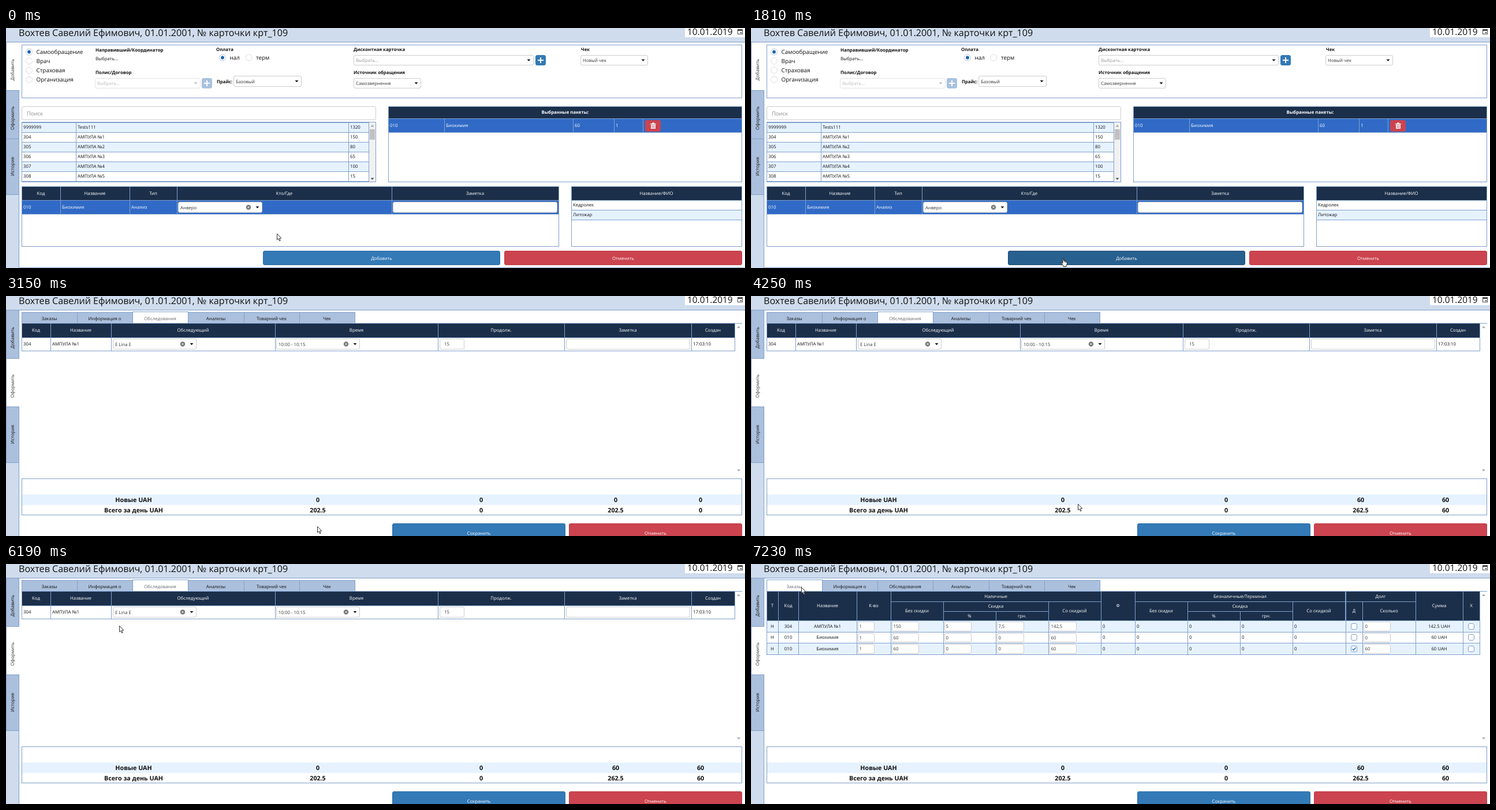
An HTML page with a canvas for the animation above (8 s loop, 1280 by 417 pixels).

```html
<!DOCTYPE html>
<html lang="ru">
<head>
<meta charset="utf-8">
<title>Карточка</title>
<style>
html, body { margin: 0; width: 100%; height: 100%; overflow: hidden; background: #cfdced; }
canvas { display: block; }
</style>
</head>
<body>
<canvas id="stage" width="1280" height="417"></canvas>
<script>
const ctx = document.getElementById('stage').getContext('2d');
const LOOP = 8000;
const C = {
  strip: '#cfdced', tab: '#abc0dd', line: '#7f9fcb', navy: '#1b2f4a', row: '#306ac6', stripe: '#e6f2ff',
  blue: '#337ab7', hover: '#286090', red: '#cb444f', ink: '#111', grey: '#999', field: '#ccc', white: '#fff'
};
const EDGE = { [C.blue]: '#2e6da4', [C.hover]: '#204d74', [C.red]: '#bf3a46' };
const UI = 7.8;

// Pointer stops: time, x, y. An arrow is placed by its tip, a hand by its upper left corner.
const STOPS = [
  [0, 469, 357], [130, 481, 362], [270, 485, 364], [420, 487, 365], [570, 488, 365],
  [840, 495, 368], [970, 507, 371], [1110, 517, 376], [1240, 526, 382], [1380, 530, 387],
  [1510, 529, 389], [1660, 534, 397], [1810, 537, 400], [3150, 539, 400],
  [4130, 549, 387], [4250, 566, 361], [4400, 606, 310], [4530, 659, 248], [4660, 683, 220],
  [5210, 683, 219], [5340, 680, 218], [5490, 668, 217], [5640, 590, 207], [5770, 469, 182],
  [5910, 362, 159], [6040, 260, 137], [6190, 196, 107], [6310, 148, 85], [6460, 107, 65],
  [6610, 89, 48], [6770, 86, 43], [6920, 84, 41], [7230, 87, 40]
];
const within = (t, from, to) => t >= from && t < to;

function text(label, x, y, { size = UI, color = C.ink, align = 'left', bold = false } = {}) {
  ctx.font = `${bold ? 700 : 400} ${size}px "Open Sans", "Noto Sans", sans-serif`;
  ctx.textRendering = 'geometricPrecision';
  ctx.textAlign = align;
  ctx.fillStyle = color;
  ctx.fillText(label, x, y + size * 0.36);
}

const fill = (x0, y0, x1, y1, color) => {
  ctx.fillStyle = color;
  ctx.fillRect(x0, y0, x1 - x0, y1 - y0);
};

function box(x0, y0, x1, y1, color, border = C.line) {
  fill(x0, y0, x1, y1, color);
  ctx.lineWidth = 1;
  ctx.strokeStyle = border;
  ctx.strokeRect(x0 + .5, y0 + .5, x1 - x0 - 1, y1 - y0 - 1);
}

function rounded(x0, y0, x1, y1, color, border = color) {
  ctx.beginPath();
  ctx.roundRect(x0 + .5, y0 + .5, x1 - x0 - 1, y1 - y0 - 1, 2.5);
  ctx.fillStyle = color;
  ctx.fill();
  ctx.lineWidth = 1;
  ctx.strokeStyle = border;
  ctx.stroke();
}

function polygon(points, color, outline) {
  ctx.beginPath();
  points.forEach(([x, y]) => ctx.lineTo(x, y));
  ctx.closePath();
  ctx.fillStyle = color;
  ctx.fill();
  if (outline) { ctx.strokeStyle = outline; ctx.lineWidth = 1; ctx.stroke(); }
}

function circle(x, y, r, color, border) {
  ctx.beginPath();
  ctx.arc(x, y, r, 0, 7);
  ctx.lineWidth = 1;
  if (color) { ctx.fillStyle = color; ctx.fill(); }
  if (border) { ctx.strokeStyle = border; ctx.stroke(); }
}

function stroke(points, color, width = 1) {
  ctx.beginPath();
  points.forEach(([x, y], i) => i ? ctx.lineTo(x, y) : ctx.moveTo(x, y));
  ctx.lineWidth = width;
  ctx.strokeStyle = color;
  ctx.stroke();
}

const triangle = (x, y, color, dir = 1) =>
  polygon([[x - 3, y - 1.5 * dir], [x + 3, y - 1.5 * dir], [x, y + 1.7 * dir]], color);

function cell(x0, y0, x1, y1, label, { color = C.white, align = 'left', ink = C.ink } = {}) {
  box(x0, y0, x1 + 1, y1 + 1, color);
  text(label, align === 'center' ? (x0 + x1) / 2 : x0 + 3, (y0 + y1) / 2, { color: ink, align });
}

const head = (x0, y0, x1, y1, label) =>
  cell(x0, y0, x1, y1, label, { color: C.navy, align: 'center', ink: C.white });

const headRow = (edges, y0, y1, labels) =>
  labels.forEach((label, i) => head(edges[i], y0, edges[i + 1], y1, label));

function input(x0, y0, x1, y1, label = '', pad = 3) {
  rounded(x0, y0, x1, y1, C.white, C.field);
  text(label, x0 + pad, (y0 + y1) / 2, { color: '#333' });
}

function select(x0, y0, x1, y1, label, { ink = '#333', arrow = C.ink, border = C.field, clear = false } = {}) {
  rounded(x0, y0, x1, y1, C.white, border);
  const y = (y0 + y1) / 2;
  text(label, x0 + 4, y + .5, { color: ink });
  triangle(x1 - 8.5, y, arrow);
  if (clear) {
    const x = x1 - 24;
    circle(x, y, 4.2, '#777');
    stroke([[x - 1.6, y - 1.6], [x + 1.6, y + 1.6]], C.white);
    stroke([[x + 1.6, y - 1.6], [x - 1.6, y + 1.6]], C.white);
  }
}

function button(x0, y0, x1, y1, labelY, label, color) {
  rounded(x0, y0, x1, y1, color, EDGE[color]);
  text(label, (x0 + x1) / 2, labelY, { color: C.white, align: 'center' });
}

function plus(x, y, color) {
  rounded(x, y, x + 18, y + 18, color);
  fill(x + 4, y + 8, x + 14, y + 10, C.white);
  fill(x + 8, y + 4, x + 10, y + 14, C.white);
}

function radio(x, y, label, checked) {
  circle(x, y, 5.5, C.white, checked ? '#b5c6dc' : '#ddd');
  if (checked) circle(x, y, 2.9, '#1f66b0');
  text(label, x + 12.5, y, { size: 9.9 });
}

function checkbox(x, y, checked) {
  rounded(x - 5, y - 5, x + 6, y + 6, C.white, C.line);
  if (checked) stroke([[x - 2.5, y + .5], [x - .3, y + 2.7], [x + 3.5, y - 2]], '#1f66b0', 1.3);
}

function frame(active) {
  fill(0, 0, 1280, 417, C.strip);
  text('Вохтев Савелий Ефимович, 01.01.2001, № карточки крт_109', 22, 8.3, { size: 16.1 });
  fill(1176, 0, 1280, 16, C.white);
  text('10.01.2019', 1180, 6.4, { size: 15.4 });
  box(1267, 2, 1276, 11, C.white, '#444');
  fill(1267, 2, 1276, 5, '#444');
  fill(1272, 7, 1274, 9, '#444');
  box(22, 24, 1281, 418, C.white);
  // Each side label: top, bottom and the centre of its upright text.
  [['Добавить', 24, 108, 72.5], ['Оформить', 108, 192, 156.5], ['История', 192, 289, 240.5]]
    .forEach(([label, y0, y1, middle], i) => {
      box(0, y0, 23, y1 + 1, i === active ? C.white : C.tab);
      if (i === active) fill(22, y0 + 1, 23, y1, C.white);
      ctx.save();
      ctx.translate(11.5, middle);
      ctx.rotate(-Math.PI / 2);
      text(label, 0, 0, { size: 8, align: 'center', color: i === active ? '#333' : C.ink });
      ctx.restore();
    });
}

function orderForm() {
  box(27, 29, 1275, 122, C.white);
  ['Самообращение', 'Врач', 'Страховая', 'Организация'].forEach((label, i) => radio(40, 41.5 + i * 16, label, !i));
  radio(375, 51.5, 'нал', true);
  radio(420.5, 51.5, 'терм');
  [['Направивший/Координатор', 155, 38], ['Оплата', 364, 37.5], ['Дисконтная карточка', 602, 37.5], ['Чек', 996, 37.5],
   ['Полис/Договор', 155, 77], ['Прайс:', 365, 93], ['Источник обращения', 602, 77]]
    .forEach(([label, x, y]) => text(label, x, y, { bold: true }));
  text('Выбрать...', 155, 53.5);
  select(154, 87, 337, 105, 'Выбрать...', { ink: '#bbb', arrow: '#bbb', border: '#e3e3e3' });
  plus(339, 87, '#a9c2de');
  select(394, 83, 512, 102, 'Базовый');
  select(602, 47, 914, 65, 'Выбрать...', { ink: C.grey });
  plus(917, 47, C.blue);
  select(602, 87, 719, 105, 'Самозвернення');
  select(995, 47, 1112, 65, 'Новый чек');
}

function searchList() {
  rounded(27, 136, 641, 160, C.white, C.field);
  text('Поиск', 36, 148.5, { size: 9.4, color: '#8a8a8a' });
  const prices = [1320, 150, 80, 65, 100, 15];
  prices.forEach((price, i) => {
    const y = 164 + i * 17, opt = { color: i % 2 ? C.white : C.stripe };
    cell(27, y, 121, y + 17, i ? 303 + i : '9999999', opt);
    cell(121, y, 593, y + 17, i ? 'АМПУЛА №' + i : 'Tests111', opt);
    cell(593, y, 628, y + 17, price, opt);
  });
  fill(28, 267, 628, 268, C.stripe);
  fill(629, 164, 640, 267, '#f1f1f1');
  fill(630, 176, 639, 194, '#c1c1c1');
  triangle(634.5, 170, '#a3a3a3', -1);
  triangle(634.5, 262, '#505050');
  ctx.strokeStyle = C.line;
  ctx.strokeRect(27.5, 163.5, 613, 104);
}

function packages() {
  box(662, 136, 1275, 268, C.white);
  fill(663, 137, 1274, 157, C.navy);
  text('Выбранные пакеты:', 968.5, 146, { bold: true, color: C.white, align: 'center' });
  const edges = [662, 759, 982, 1053, 1103, 1274];
  ['010', 'Биохимия', '60', '1', ''].forEach((label, i) =>
    cell(edges[i], 157, edges[i + 1], 181, label, { color: C.row, ink: C.white }));
  rounded(1107, 160, 1134, 180, C.red);
  fill(1116, 166, 1126, 167.3, C.white);
  fill(1119, 164.5, 1123, 166, C.white);
  fill(1117, 168, 1125, 175, C.white);
  [1118.6, 1120.6, 1122.6].forEach(x => fill(x, 169, x + .8, 174, C.red));
}

function chosenItems(hovered) {
  box(27, 275, 958, 380, C.white);
  const edges = [27, 94, 214, 296, 668, 957];
  headRow(edges, 275, 299, ['Код', 'Название', 'Тип', 'Кто/Где', 'Заметка']);
  ['010', 'Биохимия', 'Анализ', '', ''].forEach((label, i) =>
    cell(edges[i], 299, edges[i + 1], 323, label, { color: C.row, ink: C.white }));
  select(298, 302, 444, 321, 'Анверо', { clear: true });
  input(670, 302, 955, 321);
  box(979, 275, 1275, 380, C.white);
  head(979, 275, 1274, 299, 'Название/ФИО');
  cell(979, 299, 1274, 316, 'Кедролек');
  cell(979, 316, 1274, 333, 'Литожар', { color: C.stripe });
  button(445, 387, 856, 412, 400, 'Добавить', hovered ? C.hover : C.blue);
  button(863, 387, 1275, 412, 400, 'Отменить', C.red);
}

function checkout(active, hovered, updated) {
  fill(27, 47, 1275, 48, C.line);
  const labels = ['Заказы', 'Информация о', 'Обследования', 'Анализы', 'Товарний чек', 'Чек'];
  const edge = i => Math.floor(27 + i * 96.3);
  labels.forEach((label, i) => {
    const x = edge(i), next = edge(i + 1);
    const current = i === active;
    box(x, current ? 27 : 28, next + 1, 48, current ? C.white : C.tab);
    const faded = current || hovered && !i;
    text(label, (x + next) / 2, 39, { align: 'center', color: faded ? '#666' : C.ink });
  });
  triangle(1269, 54, '#a3a3a3', -1);
  triangle(1269, 303, '#a3a3a3');
  box(27, 317, 1275, 381, C.white);
  fill(28, 345, 1274, 363, C.stripe);
  const totals = updated
    ? [['Новые UAH', '0', '0', '60', '60'], ['Всего за день UAH', '202.5', '0', '262.5', '60']]
    : [['Новые UAH', '0', '0', '0', '0'], ['Всего за день UAH', '202.5', '0', '202.5', '0']];
  totals.forEach((row, i) => row.forEach((label, j) =>
    text(label, [221, 540, 823, 1056, 1203][j], 354 + i * 18, { size: 10.7, bold: true, align: 'center' })));
  button(669, 395, 969, 425, 412, 'Сохранить', C.blue);
  button(975, 395, 1275, 425, 412, 'Отменить', C.red);
}

function examinations() {
  const edges = [27, 77, 182, 466, 748, 967, 1187, 1262];
  headRow(edges, 47, 72, ['Код', 'Название', 'Обследующий', 'Время', 'Продолж.', 'Заметка', 'Создан']);
  ['304', 'АМПУЛА №1', '', '', '', '', '17:03:10'].forEach((label, i) => cell(edges[i], 72, edges[i + 1], 95, label));
  select(185, 74, 330, 93, 'E Lina E', { clear: true });
  select(468, 74, 613, 93, '10:00 - 10:15', { clear: true });
  input(751, 74, 794, 93, '15', 8);
  input(970, 74, 1185, 93);
}

function orders() {
  headRow([27, 47, 82, 183, 242], 47, 98, ['Т', 'Код', 'Название', 'К-во']);
  [[242, 'Наличные'], [665, 'Безналичные/Терминал']].forEach(([x, label]) => {
    head(x, 47, x + 364, 65, label);
    head(x, 65, x + 91, 98, 'Без скидки');
    head(x + 91, 65, x + 273, 82, 'Скидка');
    headRow([x + 91, x + 182, x + 273], 82, 98, ['%', 'грн.']);
    head(x + 273, 65, x + 364, 98, 'Со скидкой');
  });
  head(606, 47, 665, 98, 'Ф');
  head(1030, 47, 1151, 65, 'Долг');
  headRow([1030, 1059, 1151], 65, 98, ['Д', 'Сколько']);
  headRow([1151, 1233, 1262], 47, 98, ['Сумма', 'X']);

  const rows = [
    ['304', 'АМПУЛА №1', ['150', '5', '7,5', '142,5'], '0', '142.5 UAH'],
    ['010', 'Биохимия', ['60', '0', '0', '60'], '0', '60 UAH'],
    ['010', 'Биохимия', ['60', '0', '0', '60'], '60', '60 UAH']
  ];
  rows.forEach(([code, name, cash, debt, sum], i) => {
    const y = Math.round(98 + i * 19.5), y1 = Math.round(98 + (i + 1) * 19.5), mid = (y + y1) / 2;
    const color = i % 2 ? C.white : C.stripe, centered = { color, align: 'center' };
    const field = (x, width, label) => input(x, y + 2, x + width, y1 - 1, label, 2.5);
    cell(27, y, 47, y1, 'Н', centered);
    cell(47, y, 82, y1, code, centered);
    cell(82, y, 183, y1, name, centered);
    cell(183, y, 242, y1, '', { color });
    field(185, 29, '1');
    cash.forEach((value, j) => {
      const x = 242 + j * 91;
      cell(x, y, x + 91, y1, '', { color });
      field(x + 2, 47, value);
    });
    const plain = [606, 665, 756, 847, 938, 1030];
    plain.slice(0, -1).forEach((x, j) => cell(x, y, plain[j + 1], y1, '0', { color }));
    cell(1030, y, 1059, y1, '', { color });
    checkbox(1044, Math.floor(mid), i === 2);
    cell(1059, y, 1151, y1, '', { color });
    field(1061, 47, debt);
    cell(1151, y, 1233, y1, sum, centered);
    cell(1233, y, 1262, y1, '', { color });
    checkbox(1247, Math.floor(mid), false);
  });
}

function pointer(t) {
  const [, x, y] = STOPS.findLast(stop => stop[0] <= t);
  const hand = within(t, 1510, 3150) || within(t, 6770, 7230);
  const pressed = within(t, 3020, 3150) || within(t, 7070, 7230);
  ctx.save();
  ctx.translate(x, y);
  if (pressed) {
    circle(3.5, 1.5, 5.7, null, 'rgba(255,255,255,.8)');
    circle(3.5, 1.5, 6.5, null, 'rgba(40,50,65,.75)');
  }
  if (hand) {
    polygon([[3, 1], [4.5, .5], [5, 5], [7, 5], [8.7, 5.7], [10.3, 6.5], [10.5, 10], [9, 12.5], [9, 14.5],
      [4, 14.5], [3.7, 12.5], [.5, 8.5], [1, 7.3], [3, 9]], C.white, '#222');
    stroke([[6.8, 5.5], [6.8, 8]], '#222', .7);
    stroke([[8.6, 6], [8.6, 8.3]], '#222', .7);
  } else {
    polygon([[.5, .5], [.5, 11], [2.8, 8.9], [4.5, 12.9], [6.2, 12.2], [4.5, 8.3], [7.8, 8.1]], C.white, '#333');
  }
  ctx.restore();
}

function draw(now) {
  const t = now % LOOP;
  if (t < 3150) {
    frame(0);
    orderForm();
    searchList();
    packages();
    chosenItems(t >= 1510);
    fill(22, 416, 1280, 417, C.line);
  } else {
    const ordersOpen = t >= 7230;
    frame(1);
    checkout(ordersOpen ? 0 : 2, t >= 6770, t >= 3570);
    ordersOpen ? orders() : examinations();
  }
  pointer(t);
}

const start = performance.now();
function tick() {
  draw(performance.now() - start);
  requestAnimationFrame(tick);
}
tick();
</script>
</body>
</html>
```
